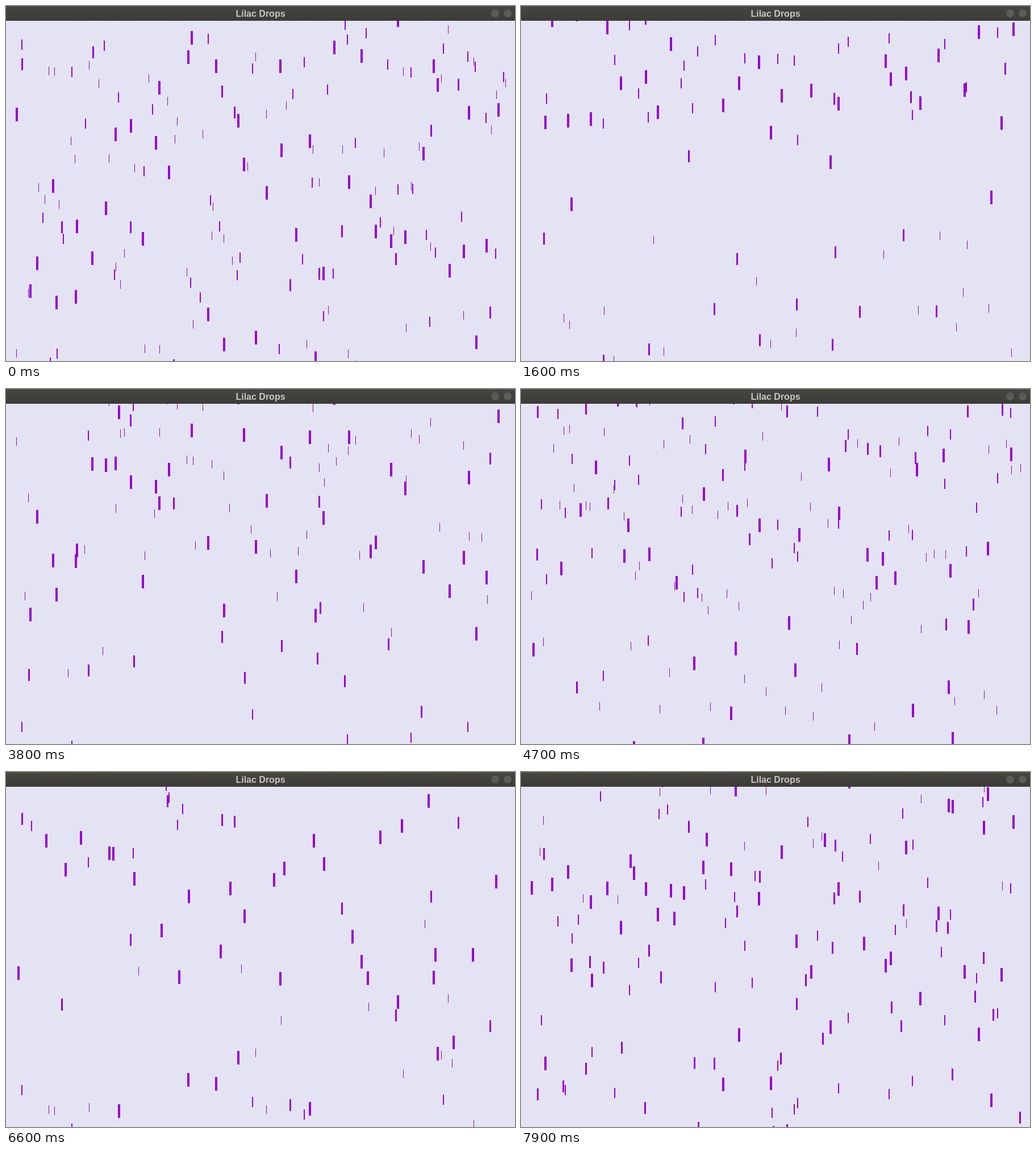
An HTML page with a canvas that plays this animation: 896 px wide and 625 px high, repeating every 8000 ms.

```html
<!DOCTYPE html>
<html lang="en">
<head>
<meta charset="utf-8">
<title>Lilac Drops</title>
<style>
  html, body { margin: 0; width: 100%; height: 100%; overflow: hidden; background: #e4e3f3; }
  canvas { position: absolute; left: 0; top: 0; }
  header {
    position: absolute; left: 0; top: 0; width: 896px; height: 26px;
    box-sizing: border-box; border-top: 1px solid #5b5a53;
    background: linear-gradient(#464640, #3c3b37);
    color: #c8c6c0; text-align: center;
    font: bold 16px/25px "Liberation Sans", Arial, sans-serif;
  }
  i { position: absolute; top: 5px; width: 14px; height: 14px; border-radius: 50%; background: #5c5b55; }
</style>
</head>
<body>
<canvas id="sky" width="896" height="625"></canvas>
<header>Lilac Drops<i style="left:854px"></i><i style="left:876px"></i></header>
<script>
const W = 896, H = 625, STEP = 100, LOOP = 8000;
const ctx = document.getElementById('sky').getContext('2d');

let seed = 20117;
function rand(lo, hi) {
  seed = (seed + 0x6D2B79F5) | 0;
  let t = Math.imul(seed ^ (seed >>> 15), 1 | seed);
  t = (t + Math.imul(t ^ (t >>> 7), 61 | t)) ^ t;
  return lo + (hi - lo) * (((t ^ (t >>> 14)) >>> 0) / 4294967296);
}

// Acceleration in px per step², by drop width.
const gravity = { 1: 0.72, 2: 2.5, 3: 3.8, 4: 4.65 };

// Each shower starts spread over the part lo to hi of its fall.
const showers = [
  { w: 4, count: 48, lo: 0.56, hi: 1 },
  { w: 4, count: 26, lo: 0.36, hi: 0.5 },
  { w: 3, count: 14, lo: 0.57, hi: 1 },
  { w: 3, count: 50, lo: 0.18, hi: 0.52 },
  { w: 2, count: 68, lo: 0.55, hi: 1.12 },
  { w: 1, count: 82, lo: 0.58, hi: 1.12 }
];

const fallTime = (start, w) => Math.sqrt(2 * (H - start) / gravity[w]);

// One drop per column of the shower keeps the rain evenly spread.
function makeShower({ w, count, lo, hi }) {
  return Array.from({ length: count }, (_, i) => {
    const x = Math.round(16 + (i + rand(0, 1)) / count * 864 - w / 2);
    const starts = Array.from({ length: 8 }, () => rand(-440, -160));
    return { w, x, starts, age: rand(lo, hi) * fallTime(starts[0], w) };
  });
}
const drops = showers.flatMap(makeShower);

// A drop that reaches the bottom falls again from a new height.
function topOf({ w, starts, age }, step) {
  let t = age + step;
  for (const start of starts) {
    const total = fallTime(start, w);
    if (t < total) return start + gravity[w] * t * t / 2;
    t -= total;
  }
  return H;
}

function draw(step) {
  ctx.fillStyle = '#e4e3f3';
  ctx.fillRect(0, 0, W, H);
  for (const drop of drops) {
    ctx.fillStyle = drop.w === 1 ? '#8a0cae' : '#9600d8';
    ctx.fillRect(drop.x, Math.round(topOf(drop, step)), drop.w, 12 + 3 * drop.w);
  }
}

const begin = performance.now();
let shown = -1;
function tick() {
  const step = Math.floor(((performance.now() - begin) % LOOP) / STEP);
  if (step !== shown) draw(shown = step);
  requestAnimationFrame(tick);
}
tick();
</script>
</body>
</html>
```
